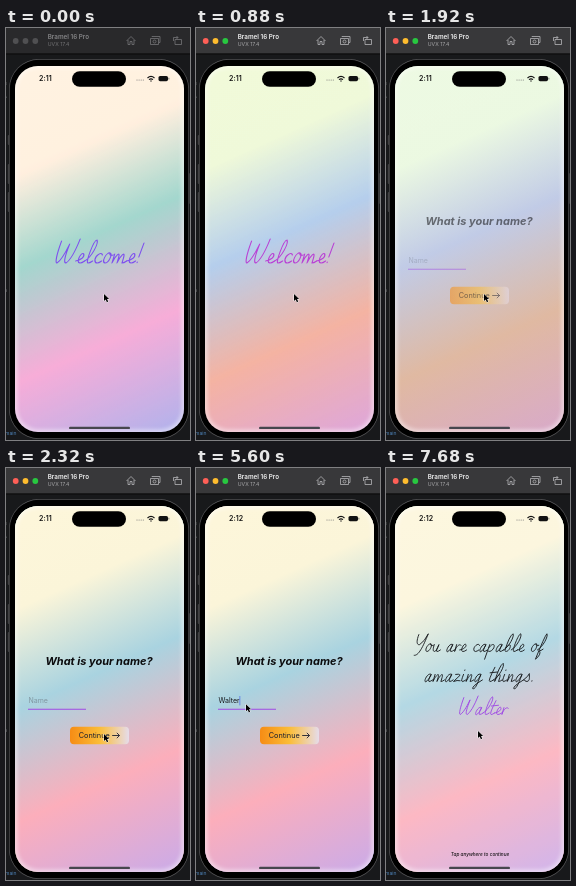
These frames come from a looping animation (184x412 px, 8000 ms). An HTML page with a canvas:

```html
<!DOCTYPE html>
<html lang="en">
<head>
<meta charset="utf-8">
<title>Welcome flow</title>
<style>
html, body { margin: 0; width: 100%; height: 100%; overflow: hidden; background: #18191b; }
canvas { display: block; width: 184px; height: 412px; }
</style>
</head>
<body>
<canvas id="stage" aria-label="Phone onboarding animation"></canvas>
<script>
const canvas = document.getElementById('stage');
const c = canvas.getContext('2d');
const dpr = window.devicePixelRatio || 1;
canvas.width = 184 * dpr;
canvas.height = 412 * dpr;

const LOOP = 8000;
const SANS = 'Inter, Roboto, sans-serif';
const PURPLE = '#9f48e4';
const NAME = 'Walter';

// Pen strokes for the handwriting: baseline 0, x-height 10, advance width first.
const tail = 'q2 0 4-2', hump = 'c1-7 5-13 5-5v5', stem = 'M1-9V0';
const loop = 'M0-2C6-6 9-20 6-23';
const bowl = 'M7-9C3-12 0-3 2 0C4 2 7-6 7-9';
const down = 'q-2 9 0 9' + tail;
const dot = 'M2-1v.6';
const glyphs = {
  W: [21, 'M1-22C0-8 1 0 3 0C7-3 9-14 10-19C9-8 9 0 12 0Q17-4 19-24'],
  Y: [14, 'M1-22C0-12 3-8 6-9Q11-13 13-23C11-6 9 6 3 5'],
  a: [11, bowl + down],
  b: [10, loop + 'Q2-20 2-1C5 2 9-3 7-8Q5-10 2-5'],
  c: [9, 'M8-8C6-12 1-7 2-3Q3 0 5 0' + tail],
  e: [9, 'M0-2C5-3 8-6 6-9C3-12 0 0 5 0' + tail],
  f: [9, loop + 'Q4-20 1 10Q7 4 3-1' + tail],
  g: [11, bowl + 'C6 6 5 10 2 9Q0 6 11-2'],
  h: [11, loop + 'Q2-20 2 0' + hump + tail],
  i: [6, 'M1-9Q0 0 2 0' + tail + 'M1-14v-.6'],
  l: [8, loop + 'C3-23 1 0 4 0' + tail],
  m: [15, stem + hump + hump + tail],
  n: [10, stem + hump + tail],
  o: [10, 'M6-10C2-11 0-1 4 0C8 0 9-9 6-10Q6-7 10-8'],
  p: [10, 'M1-9L0 10M1-5C5-13 9-8 7-3Q4 2 1-1'],
  r: [7, stem + 'c0-6 3-11 6-8'],
  s: [9, 'M0-2Q5-7 5-10C6-6 9-1 5 0Q2 0 1-2'],
  t: [7, 'M4-18Q0 0 3 0' + tail + 'M0-11L9-12'],
  u: [11, 'M1-9C0 3 7 3 7-9' + down],
  z: [10, 'M1-9Q5-10 7-8L1 0Q5-2 9-1'],
  '!': [5, 'M3-20L2-6' + dot],
  '.': [4, dot],
  ' ': [7, '']
};

const clamp = x => Math.max(0, Math.min(1, x));
const ramp = (t, from, to) => {
  const k = clamp((t - from) / (to - from));
  return k * k * (3 - 2 * k);
};
const mix = (a, b, k) => a + (b - a) * k;

function layer(alpha, draw) {
  if (alpha <= 0) return;
  c.save();
  c.globalAlpha = alpha;
  draw();
  c.restore();
}

function box(x, y, w, h, r, fill) {
  c.beginPath();
  c.roundRect(x, y, w, h, r);
  c.fillStyle = fill;
  c.fill();
}

function disc(x, y, r, fill) {
  box(x - r, y - r, 2 * r, 2 * r, r, fill);
}

function text(str, x, y, font, fill, align = 'left') {
  c.font = font + ' ' + SANS;
  c.fillStyle = fill;
  c.textAlign = align;
  c.textBaseline = 'middle';
  c.fillText(str, x, y);
}

function line(d, color, width) {
  c.strokeStyle = color;
  c.lineWidth = width;
  c.stroke(new Path2D(d));
}

function script(str, x, y, scale, color, width) {
  c.save();
  c.transform(scale, 0, -0.3 * scale, scale, x, y);
  c.lineCap = c.lineJoin = 'round';
  for (const ch of str) {
    const [advance, d] = glyphs[ch];
    line(d, color, width / scale);
    c.translate(advance, 0);
  }
  c.restore();
}

function gradient(x0, y0, x1, y1, stops) {
  const g = c.createLinearGradient(x0, y0, x1, y1);
  stops.forEach(([at, color]) => g.addColorStop(at, color));
  return g;
}

const sky = gradient(93, 20, 250, 369, [
  [0, '#fdf6da'], [0.2, '#fbf5d9'], [0.44, '#a9d3e0'], [0.71, '#fcaebb'], [1, '#cbabe8']
]);
const amber = gradient(64, 0, 123, 0, [
  [0, '#f68c14'], [0.5, '#fbbd38'], [1, '#e6dcea']
]);

function screen(fill) {
  box(9, 38, 169, 366, 23, fill);
}

// Soft light rim where the blurred background meets the bezel.
function rim() {
  c.save();
  c.beginPath();
  c.roundRect(9, 38, 169, 366, 23);
  c.clip();
  c.filter = `blur(${2 * dpr}px)`;
  c.strokeStyle = 'rgba(255,255,255,.6)';
  c.lineWidth = 4;
  c.stroke();
  c.restore();
}

function chrome(active) {
  c.fillStyle = '#18191b';
  c.fillRect(0, 0, 184, 412);
  c.fillStyle = active ? '#38383a' : '#29292b';
  c.fillRect(0, 0, 184, 25.5);
  c.fillStyle = '#0a0a0b';
  c.fillRect(0, 25.5, 184, 1);
  const lights = active ? ['#fe5f57', '#febc2e', '#28c840'] : ['#505052', '#505052', '#505052'];
  lights.forEach((color, i) => disc(9.7 + 9.8 * i, 13, 2.9, color));
  text('Bramel 16 Pro', 41.7, 9.5, '600 6.3px', active ? '#f2f2f2' : '#858587');
  text('UVX 17.4', 41.7, 16.8, '5.2px', active ? '#a9a9ab' : '#747476');
  const icon = active ? '#b4b4b6' : '#747476';
  line('M120.5 13L125 8.5L129.5 13M122 12V16.5H124V13.5H126V16.5H128V12', icon, 0.8);
  line('M146 9V8.5H154V14.5H153M144.5 10.5H152.5V16.5H144.5ZM147 13.5a1.5 1.5 0 1 0 3 0a1.5 1.5 0 1 0-3 0', icon, 0.8);
  line('M169 11.5H175.5V16.5H169ZM167.5 13V9.5H172M170.5 8L172 9.5L170.5 11', icon, 0.8);

  text('e', -2, 55, '5px', '#77777c');
  text(',', 0, 67, '5px', '#77777c');
  text('n', -2, 262, '5px', '#77777c');
  text('main', -1, 405, '5px', '#4d83b9');

  [[107, 10], [136, 20], [164, 20]].forEach(([y, h]) => box(1.8, y, 2, h, 1, '#414143'));
  box(182, 145, 1.8, 31, 1, '#414143');
  box(3, 31, 180, 380, 30, '#555557');
  box(3.7, 31.7, 178.6, 378.6, 29.3, '#000');
}

function statusBar(t) {
  box(66, 43.3, 54, 15.4, 7.7, '#000');
  text(t < 5360 ? '2:11' : '2:12', 33, 50.8, '600 7.1px', '#111');
  for (let i = 0; i < 4; i++) disc(131 + 2.1 * i, 52, 0.55, '#777');
  line('M141.5 50Q145 46.8 148.5 50M143 51.7Q145 50 147 51.7', '#111', 1.1);
  disc(145, 53, 0.7, '#111');
  box(152.5, 48, 9.5, 5.2, 1.6, '#111');
  box(162.5, 49.6, 0.8, 2, 0.4, '#555');
  box(63, 398.7, 61, 2.4, 1.2, '#46464e');
}

function welcome(t, hue) {
  const out = ramp(t, 1320, 1720);
  layer(1 - out, () => {
    c.filter = `hue-rotate(${hue / 2}deg)` + (out ? ` blur(${2 * out * dpr}px)` : '');
    c.translate(93, 225);
    c.scale(1 - 0.18 * out, 1 - 0.3 * out);
    c.translate(-93, -225);
    script('Welcome!', 48, 235, 1, PURPLE, 1.15);
  });
}

function question(t) {
  text('What is your name?', 93, 193.2, 'italic 700 11px', '#0b0b0d', 'center');
  const typed = NAME.slice(0, Math.max(0, Math.floor((t - 4560) / 130)));
  text(typed || 'Name', 22.5, 233, '7px', typed ? '#18181b' : 'rgba(95,100,110,.55)');
  if (t >= 4080) {
    const end = typed ? c.measureText(typed).width : 0;
    box(22.2 + end, 228, 0.9, 9.5, 0.4, '#5f7fe6');
  }
  box(22, 240.8, 58, 1, 0, PURPLE);
  const pressed = t > 6320 && t < 6480;
  layer(c.globalAlpha * (pressed ? 0.6 : 1), () => {
    box(64, 258.7, 59, 17.5, 4, amber);
    text('Continue', 72.7, 267.6, '7.3px', '#1d2030');
    line('M106.2 267.5H113.5M110.8 264.8L113.5 267.5L110.8 270.2', '#1d2030', 0.9);
  });
}

function quote() {
  script('You are capable of', 27, 183.5, 0.77, '#17191c', 0.85);
  script('amazing things.', 37.5, 213.5, 0.79, '#17191c', 0.85);
  script(NAME, 72, 246.5, 0.77, PURPLE, 0.85);
  text('Tap anywhere to continue', 94, 387, 'italic 500 4.7px', '#141214', 'center');
}

function pointer(t) {
  const toField = ramp(t, 3280, 3960);
  const toButton = ramp(t, 5440, 6160);
  const drift = ramp(t, 6720, 7000);
  const x = mix(mix(98, 44, toField), 91, toButton) + drift;
  const y = mix(mix(266, 232, toField), 265, toButton) - 2 * drift;
  c.save();
  c.translate(x, y);
  const arrow = new Path2D('M0 0V7L1.7 5.6L2.9 8.2L4.2 7.6L3 5.1H5.1Z');
  c.strokeStyle = '#fff';
  c.lineWidth = 0.9;
  c.stroke(arrow);
  c.fillStyle = '#000';
  c.fill(arrow);
  c.restore();
}

function draw(t) {
  c.setTransform(dpr, 0, 0, dpr, 0, 0);
  chrome(t >= 80);
  const hue = -28 + t * 0.06;
  const asked = ramp(t, 1560, 2240);
  layer(1, () => {
    c.filter = `hue-rotate(${hue}deg)`;
    screen(sky);
  });
  layer(asked, () => screen(sky));
  welcome(t, hue);

  const answered = ramp(t, 6480, 7040);
  layer(answered * 0.12, () => screen('#fff'));
  rim();
  layer(asked * (1 - ramp(t, 6560, 6960)), () => question(t));
  layer(answered, quote);
  statusBar(t);
  pointer(t);
}

function tick(now) {
  draw(now % LOOP);
  requestAnimationFrame(tick);
}
requestAnimationFrame(tick);
</script>
</body>
</html>
```
